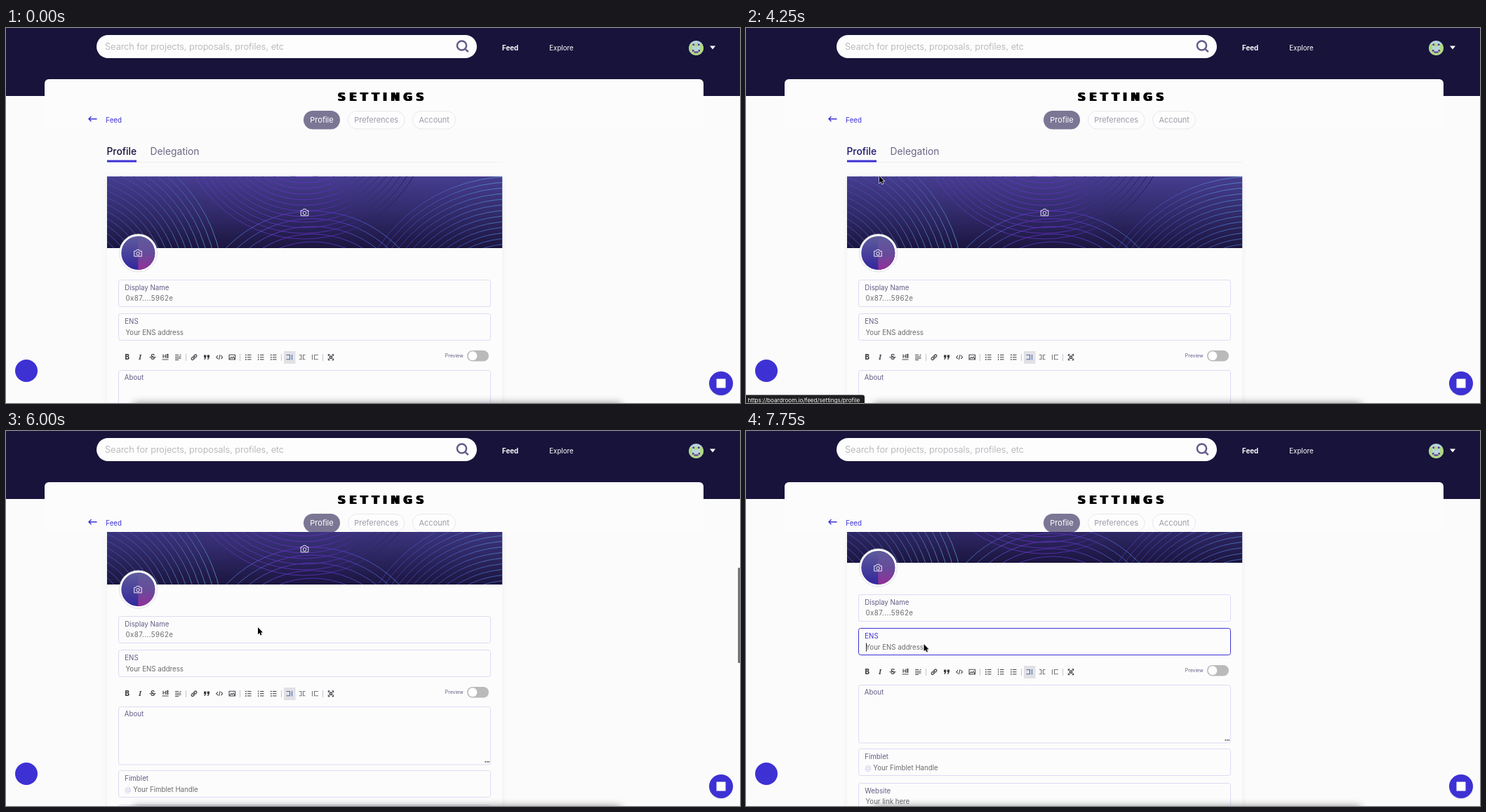
Animation of 1046x535 px, one loop 8 s. Source, as an HTML page:

```html
<!DOCTYPE html>
<html lang="en">
<head>
<meta charset="utf-8">
<title>Profile settings</title>
<style>
html, body { margin: 0; width: 100%; height: 100%; overflow: hidden; background: #fbfbfb; }
svg { position: absolute; left: 0; top: 0; display: block; }
text { font-family: Inter, "Open Sans", sans-serif; font-size: 9.7px; white-space: pre; }
h1 {
  position: absolute; left: 472px; top: 91.6px; margin: 0; color: #000;
  font: bold 15px/15px "DejaVu Sans", Verdana, sans-serif; letter-spacing: 5.6px; white-space: nowrap;
  text-shadow: 1px 0 #000, 2px 0 #000;
}
.box { fill: #fcfcfc; stroke: #dddaf4; }
.label { fill: #625d86; }
.value { fill: #6c6c70; }
.pill { font-size: 11px; fill: #9d9ba9; }
.tab { font-size: 13.8px; fill: #6b6884; }
.ico { fill: none; stroke: #4a4a50; stroke-width: 1.1; }
.ico text { fill: #3c3c42; stroke: none; }
.cam { fill: none; stroke: #fff; stroke-width: .9; stroke-linejoin: round; }

/* every change falls on a quarter second = 3.125% */
.a { animation: 8s step-end infinite; }
#pointer { animation-name: pointer; }
#page { animation-name: page; }
#thumb { animation-name: thumb; }
#status { animation-name: status; }
#tabOn { animation-name: tabOn; }
#tabOff { animation-name: tabOff; }
#nameBox .box { animation-name: nameEdge; }
#nameBox .label { animation-name: nameLabel; }
#nameBox .caret { animation-name: nameCaret; }
#ensBox .box { animation-name: ensEdge; }
#ensBox .label { animation-name: ensLabel; }
#ensBox .caret { animation-name: ensCaret; }

@keyframes pointer {
  0% { transform: translate(-30px, -30px); }
  18.75% { transform: translate(487px, 20.5px); }
  21.875% { transform: translate(462px, 98.5px); }
  25% { transform: translate(454px, 134.5px); }
  28.125% { transform: translate(452px, 135.5px); }
  37.5% { transform: translate(207px, 177.5px); }
  40.625% { transform: translate(146px, 180px); }
  43.75% { transform: translate(146px, 181px); }
  53.125% { transform: translate(190px, 211px); }
  56.25% { transform: translate(226px, 266px); }
  59.375% { transform: translate(194.5px, 315.5px); }
  62.5% { transform: translate(194.5px, 316px); }
  65.625% { transform: translate(353px, 280px); }
  68.75%, 71.875% { transform: translate(359px, 280px); }
  81.25% { transform: translate(318px, 268.5px); }
  84.375% { transform: translate(267px, 270px); }
  90.625% { transform: translate(266.5px, 271px); }
  93.75% { transform: translate(252.5px, 303px); }
  96.875%, 100% { transform: translate(253.5px, 304px); }
}
@keyframes page {
  0% { transform: none; }
  71.875% { transform: translateY(-18.7px); }
  75% { transform: translateY(-95px); }
  78.125%, 100% { transform: translateY(-126px); }
}
@keyframes thumb {
  0% { opacity: 0; transform: translateY(168px); }
  71.875% { opacity: 1; transform: translateY(168px); }
  75% { opacity: 1; transform: translateY(195px); }
  78.125% { opacity: 1; transform: translateY(206px); }
  87.5%, 100% { opacity: 0; transform: translateY(206px); }
}
@keyframes status { 0% { opacity: 0; } 43.75% { opacity: 1; } 56.25% { opacity: .5; } 59.375%, 100% { opacity: 0; } }
@keyframes tabOn { 0% { fill: #15113c; } 43.75% { fill: #1c1566; } 56.25%, 100% { fill: #15113c; } }
@keyframes tabOff { 0% { fill: #6b6884; } 37.5% { fill: #3a326c; } 40.625%, 100% { fill: #6b6884; } }
@keyframes nameEdge { 0% { stroke: #dddaf4; } 81.25% { stroke: #3d31d4; } 93.75%, 100% { stroke: #dddaf4; } }
@keyframes nameLabel { 0% { fill: #625d86; } 81.25% { fill: #3d31d4; } 93.75%, 100% { fill: #625d86; } }
@keyframes nameCaret { 0% { opacity: 0; } 84.375% { opacity: 1; } 90.625%, 100% { opacity: 0; } }
@keyframes ensEdge { 0% { stroke: #dddaf4; } 93.75%, 100% { stroke: #3d31d4; } }
@keyframes ensLabel { 0% { fill: #625d86; } 93.75%, 100% { fill: #3d31d4; } }
@keyframes ensCaret { 0% { opacity: 0; } 96.875%, 100% { opacity: 1; } }
</style>
</head>
<body>
<svg width="1046" height="535" viewBox="0 0 1046 535">
  <defs>
    <linearGradient id="night" x2="0" y2="1"><stop stop-color="#463d90"/><stop offset=".5" stop-color="#322b6b"/><stop offset="1" stop-color="#1b153f"/></linearGradient>
    <linearGradient id="coolL" gradientUnits="userSpaceOnUse" x1="170" y1="212" x2="300" y2="314"><stop stop-color="#4350ae"/><stop offset=".5" stop-color="#4a74c4"/><stop offset="1" stop-color="#5eb0d8"/></linearGradient>
    <linearGradient id="coolR" gradientUnits="userSpaceOnUse" x1="540" y1="314" x2="707" y2="212"><stop stop-color="#4a3fc4"/><stop offset=".5" stop-color="#4a5cc4"/><stop offset="1" stop-color="#5ca8d4"/></linearGradient>
    <linearGradient id="violet" gradientUnits="userSpaceOnUse" x1="270" y1="0" x2="580" y2="0"><stop stop-color="#6a38c8"/><stop offset=".6" stop-color="#6535c6"/><stop offset=".85" stop-color="#2a2258"/><stop offset="1" stop-color="#1b1540"/></linearGradient>
    <linearGradient id="arch" gradientUnits="userSpaceOnUse" x1="315" y1="0" x2="560" y2="0"><stop stop-color="#4e8ed2"/><stop offset=".35" stop-color="#6a36d0"/><stop offset=".65" stop-color="#5a3cd0"/><stop offset="1" stop-color="#4e8ed2"/></linearGradient>
    <linearGradient id="faceL" x2="0" y2="1"><stop stop-color="#5f5c9c"/><stop offset="1" stop-color="#32269c"/></linearGradient>
    <linearGradient id="faceR" x2="0" y2="1"><stop stop-color="#5f5c9c"/><stop offset=".5" stop-color="#664c9a"/><stop offset="1" stop-color="#932f98"/></linearGradient>
    <clipPath id="view"><rect y="144" width="1046" height="391"/></clipPath>
    <clipPath id="cover"><rect x="144" y="211.5" width="563.5" height="102.5"/></clipPath>
    <clipPath id="face"><circle cx="983.5" cy="28.5" r="10.5"/></clipPath>
    <filter id="soft" x="-10%" y="-300%" width="120%" height="700%"><feGaussianBlur stdDeviation="6"/></filter>
    <filter id="halo" x="-5%" y="-5%" width="110%" height="110%"><feGaussianBlur stdDeviation="4"/></filter>
    <g id="camera" class="cam"><path d="M-5.3-2.7H-2.8L-1.8-4.6H1.8L2.8-2.7H5.3V4.8H-5.3Z"/><circle cy=".9" r="2.3"/></g>
  </defs>

  <rect width="1046" height="535" fill="#fbfbfb"/>
  <rect width="1046" height="97" fill="#17133b"/>
  <path d="M55 144V79a6 6 0 0 1 6-6H988a6 6 0 0 1 6 6V144Z" fill="#fcfcfc"/>

  <!-- top bar -->
  <rect x="129" y="10" width="542" height="33" rx="16.5" fill="#fdfdfd"/>
  <text x="141" y="31" fill="#a9a8ae" style="font-size:12.8px;font-weight:300">Search for projects, proposals, profiles, etc</text>
  <g fill="none" stroke="#635d8a" stroke-width="2.5"><circle cx="649.5" cy="25" r="6.6"/><path d="M654.3 29.8 658.8 34.2"/></g>
  <text x="707" y="31.5" fill="#fff" font-weight="700">Feed</text>
  <text x="774.3" y="31.5" fill="#fff">Explore</text>
  <g clip-path="url(#face)">
    <path fill="#b7d5dc" d="M973 18h21v21h-21z"/>
    <path fill="#b0d880" d="M973 23h5v11h-5zM989 23h5v11h-5zM976 33h15v6h-15zM981 22h5v5h-5z"/>
    <path fill="#5a33a6" d="M978.500 22.500h2.500v2.500h-2.500zM986 22.500h2.500v2.500h-2.500zM978 31h2.500v2.500h-2.500zM986.500 31h2.500v2.500h-2.500zM980.500 33.500h6v2h-6z"/>
  </g>
  <path d="M1003 25.500H1011L1007 30.500Z" fill="#fff"/>

  <!-- settings head -->
  <path d="M129.500 129.700H118M121.500 126.200 118 129.700 121.500 133.200" fill="none" stroke="#3d31d4" stroke-width="1.4"/>
  <text x="142.300" y="134.700" fill="#3d31d4">Feed</text>
  <rect x="424" y="118" width="52" height="26.500" rx="13.200" fill="#7c7695"/>
  <g fill="#fdfdfd" stroke="#e9e8ef"><rect x="487.500" y="118.500" width="80.500" height="25.500" rx="12.700"/><rect x="579.500" y="118.500" width="61" height="25.500" rx="12.700"/></g>
  <text class="pill" x="433.300" y="135" style="fill:#fff">Profile</text>
  <text class="pill" x="496.200" y="135">Preferences</text>
  <text class="pill" x="588.500" y="135">Account</text>

  <g clip-path="url(#view)">
    <g id="page" class="a">
      <text id="tabOn" class="tab a" x="143.500" y="181" font-weight="500">Profile</text>
      <text id="tabOff" class="tab a" x="205.600" y="181">Delegation</text>
      <path d="M186 191.500H707" stroke="#efeff2"/>
      <rect x="144" y="188.500" width="42" height="3" fill="#3d31d4"/>

      <rect x="144" y="212" width="564" height="520" fill="#000" opacity=".05" filter="url(#halo)"/>
      <rect x="144" y="212" width="563.500" height="520" fill="#fcfcfc"/>
      <g clip-path="url(#cover)">
        <rect x="144" y="211.500" width="563.500" height="102.500" fill="url(#night)"/>
        <g id="rings" fill="none" stroke-width=".9" opacity=".8"></g>
      </g>
      <use href="#camera" x="425.500" y="263"/>
      <circle cx="188.500" cy="321" r="27" fill="#fdfdfd" stroke="#dcdbe4" stroke-width=".8"/>
      <circle cx="188.300" cy="321" r="24" fill="url(#faceL)"/>
      <path d="M188.300 297A24 24 0 0 1 188.300 345Z" fill="url(#faceR)"/>
      <use href="#camera" x="188" y="321"/>

      <g id="nameBox">
        <rect class="box a" x="160.500" y="359.500" width="530" height="38" rx="3"/>
        <text class="label a" x="169.300" y="373.500">Display Name</text>
        <text class="value" x="170.500" y="389.200" letter-spacing=".45">0x87....5962e</text>
        <path class="caret a" d="M171.500 379.500V391.500" stroke="#222"/>
      </g>
      <g id="ensBox">
        <rect class="box a" x="160.500" y="407.500" width="530" height="38" rx="3"/>
        <text class="label a" x="169.300" y="422">ENS</text>
        <text class="value" x="170.500" y="438">Your ENS address</text>
        <path class="caret a" d="M171.500 428.500V440.500" stroke="#222"/>
      </g>

      <!-- editor bar -->
      <rect x="396" y="461" width="16.500" height="18" fill="#e1e1e5"/>
      <g id="bar" class="ico">
        <text x="169.600" y="473.200" font-weight="800">B</text>
        <text x="189" y="473.200" style="font-family:'Noto Serif',serif;font-style:italic;font-weight:700">I</text>
        <text x="205.900" y="473.200" font-weight="600">S</text><path d="M204.500 469.700H213.500"/>
        <path d="M224 465.500V471M224 468.300H227.500M227.500 465.500V471M229.500 471V465.500H231V471M222.500 473H231.500"/>
        <path d="M241 466.500H246M241 469H249.500M241 471.300H249.500M241 473.500H246M247.500 466.500H249.500"/>
        <path d="M267 468.500 269 466.500a1.700 1.700 0 0 1 2.400 2.400L269.500 470.800M269 471 267 473a1.700 1.700 0 0 1-2.400-2.400L266.500 468.700M266.500 471.200 269.500 468.200" stroke-width="1.300"/>
        <path d="M282 466.500H285.300V469.500L283.600 473H282.300L283.300 470H282ZM286.700 466.500H290V469.500L288.300 473H287L288 470H286.700Z" fill="#3c3c42" stroke="none"/>
        <path d="M302 467.200 299.800 469.700 302 472.200M306.400 467.200 308.600 469.700 306.400 472.200M305 466.200 303.400 473.200"/>
        <path d="M318 466.300H326.500V473H318ZM318.500 472.500 321 469.500 322.500 471 324 469 326 472.500"/>
        <path d="M459.500 468V466H461.500M464.500 466H466.500V468M466.500 471.500V473.500H464.500M461.500 473.500H459.500V471.500M461.500 468.300H464.500V471.200H461.500Z" stroke-width="1.400"/>
        <path d="M417.800 466.500H420.800V472.800H417.800M426.500 466.500H423.500V472.800H426.500M436.500 466V473.500M445 466.500H439.500V472.800H445" stroke="#77777d"/>
        <path d="M399.500 466.500H404.500V472.800H399.500M407.500 466V473.500" stroke="#4d6ab4"/>
        <path d="M256.500 465V475M333.500 465V475M392.500 465V475M451.500 465V475" stroke="#c9c9ce"/>
      </g>
      <text x="625.800" y="470" class="label" style="font-size:6.900px">Preview</text>
      <rect x="657" y="460" width="31" height="15.500" rx="7.700" fill="#bababa"/>
      <circle cx="665" cy="467.700" r="6.400" fill="#fdfdfd"/>

      <rect class="box" x="160.500" y="488.500" width="530" height="82.500" rx="3"/>
      <text class="label" x="168.800" y="501.700">About</text>
      <path d="M682.500 567H689" stroke="#333" stroke-width="1.400" stroke-dasharray="1.500 1"/>
      <rect class="box" x="160.500" y="579.500" width="530" height="38" rx="3"/>
      <text class="label" x="169.300" y="593.800">Fimblet</text>
      <text x="169.300" y="609.600" fill="#c6c2ea">@</text>
      <text class="value" x="181.300" y="609.600">Your Fimblet Handle</text>
      <rect class="box" x="160.500" y="628.500" width="530" height="38" rx="3"/>
      <text class="label" x="169.300" y="642.500">Website</text>
      <text class="value" x="170.500" y="658.300">Your link here</text>
    </g>
  </g>

  <!-- overlays -->
  <rect x="182" y="536" width="694" height="20" fill="#000" opacity=".5" filter="url(#soft)"/>
  <circle cx="29" cy="489" r="16" fill="#3d31d4"/>
  <circle cx="1019" cy="508" r="17.500" fill="#000" opacity=".08"/>
  <circle cx="1019" cy="507" r="17" fill="#3d31d4"/>
  <rect x="1012.500" y="500.500" width="13" height="13" fill="#fff"/>
  <rect id="thumb" class="a" x="1043" width="5" height="136" rx="1.500" fill="#77777a"/>
  <g id="status" class="a">
    <path d="M0 523.500H166a3 3 0 0 1 3 3V535H0Z" fill="#1f1f21"/>
    <text x="2.500" y="533.500" fill="#fff" style="font-size:8.150px">https://boardroom.io/feed/settings/profile</text>
  </g>
  <g id="pointer" class="a"><path d="M0 0V10.200L2.300 8 3.800 11.600 5.500 10.900 4.100 7.500H7Z" stroke="#fff" stroke-width="1.200" paint-order="stroke"/></g>
</svg>
<h1>SETTINGS</h1>
<script>
const NS = "http://www.w3.org/2000/svg";

function add(parent, tag, attrs) {
  const el = document.createElementNS(NS, tag);
  for (const key in attrs) el.setAttribute(key, attrs[key]);
  parent.append(el);
}

// concentric circles that make the cover pattern
function rings(cx, cy, from, to, step, paint) {
  const group = document.getElementById("rings");
  for (let r = to; r >= from; r -= step) add(group, "circle", { cx, cy, r, stroke: `url(#${paint})` });
}
rings(425, 121, 92, 180, 8, "violet");
rings(90, 370, 70, 220, 9, "coolL");
rings(720, 440, 130, 228, 8, "coolR");
rings(437, 431, 122, 170, 11, "arch");

// the three list icons
const bar = document.getElementById("bar");
[341, 359, 377].forEach((x, kind) => {
  for (let row = 0; row < 3; row++) {
    const y = 466.5 + row * 3.2;
    add(bar, "path", { d: `M${x + 3} ${y}H${x + 8.5}` });
    add(bar, "path", { d: `M${x} ${y}h${kind === 1 ? 1.1 : 1.7}`, "stroke-width": kind === 1 ? 2 : 1.5 });
  }
});
</script>
</body>
</html>
```
